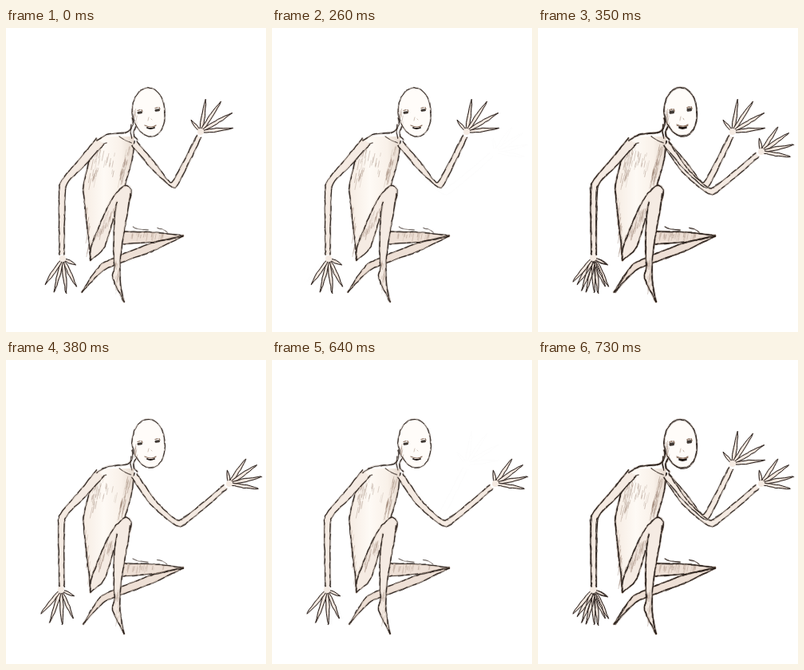
Write an HTML page that moves like this. It is 326x381 px and loops after 760 ms.

```html
<!DOCTYPE html>
<html lang="en">
<head>
<meta charset="utf-8">
<title>Waving figure</title>
<style>
  html, body { margin: 0; width: 100%; height: 100%; overflow: hidden; background: #fff; }
  svg { display: block; width: 326px; height: 381px; background: #fff; isolation: isolate; }
  .pose { mix-blend-mode: darken; }
  path { stroke-linecap: round; stroke-linejoin: round; }
</style>
</head>
<body>
<svg id="stage" viewBox="0 0 326 381">
  <defs>
    <linearGradient id="torso">
      <stop offset="0" stop-color="#f6ece3"/>
      <stop offset=".4" stop-color="#fefaf5"/>
      <stop offset=".75" stop-color="#f9f1e9"/>
      <stop offset="1" stop-color="#e6d9ce"/>
    </linearGradient>
  </defs>
</svg>
<script>
const INK = '#1d1511', BROWN = '#8a6f5e', SKIN = '#f5ebe3', SHADE = '#eee0d6';
const stage = document.getElementById('stage');
let seed = 1, g;
const rnd = () => (seed = seed * 16807 % 2147483647) / 2147483647;
const jit = a => (rnd() - .5) * a;
const pts = s => s.split(' ').map(p => p.split(',').map(Number));
const polar = ([x, y], deg, r) =>
  [x + r * Math.cos(deg * Math.PI / 180), y + r * Math.sin(deg * Math.PI / 180)];

function add(parent, tag, attrs) {
  const e = document.createElementNS('http://www.w3.org/2000/svg', tag);
  for (const k in attrs) e.setAttribute(k, attrs[k]);
  return parent.appendChild(e);
}

// Samples a smooth curve through the key points, about every 4 px
function trace(p, stiff = 6) {
  const out = [p[0]];
  for (let i = 0; i < p.length - 1; i++) {
    const a = p[i - 1] || p[i], b = p[i], c = p[i + 1], d = p[i + 2] || c;
    const n = Math.max(2, Math.round(Math.hypot(c[0] - b[0], c[1] - b[1]) / 4));
    for (let j = 1; j <= n; j++) {
      const t = j / n, u = 1 - t;
      out.push([0, 1].map(k => u * u * u * b[k] + 3 * u * u * t * (b[k] + (c[k] - a[k]) / stiff) +
        3 * u * t * t * (c[k] - (d[k] - b[k]) / stiff) + t * t * t * c[k]));
    }
  }
  return out;
}

const poly = (p, wobble = 0) =>
  'M' + p.map(([x, y]) => `${(x + jit(wobble)).toFixed(1)},${(y + jit(wobble)).toFixed(1)}`).join('L');
const fill = (p, color) => add(g, 'path', { d: poly(p) + 'Z', fill: color });
const stroke = (d, color, width, opacity = 1, dash = 'none') => add(g, 'path',
  { d, fill: 'none', stroke: color, 'stroke-width': width, opacity, 'stroke-dasharray': dash });

// Pencil line: soft smudge, scratchy core, broken second pass
function ink(p, w = 1) {
  stroke(poly(p), BROWN, 2.8 * w, .22);
  stroke(poly(p, .9), INK, .8 * w, .9);
  const dash = [4, 5, 9, 3, 6, 8].map(v => (v * (.6 + rnd())).toFixed(1)).join(' ');
  stroke(poly(p, 1.4), INK, 1.1 * w, .75, dash);
}
const line = (s, w) => ink(trace(pts(s)), w);

// Limb through joints given as x,y,halfWidth
function limb(s, color = SKIN) {
  const joints = pts(s);
  const edge = side => trace(joints.map(([x, y, w], i) => {
    const a = joints[i - 1] || joints[i], b = joints[i + 1] || joints[i];
    const dx = b[0] - a[0], dy = b[1] - a[1], len = Math.hypot(dx, dy);
    return [x - side * w * dy / len, y + side * w * dx / len];
  }), 14);
  const l = edge(1), r = edge(-1);
  fill([...l, ...r.slice().reverse()], color);
  ink(l);
  ink(r);
}

function finger(c, deg, len, w) {
  const side = s => [polar(polar(c, deg, 4), deg + 90, s * w * .7),
    polar(polar(c, deg, len * .5), deg + 90, s * w), polar(c, deg, len)];
  const d = trace([...side(-1), ...side(1).reverse().slice(1)], 9);
  fill(d, SKIN);
  stroke(poly(d, .7), BROWN, 2, .2);
  stroke(poly(d, .9), INK, 1, .95);
}

// Four fingers fanned from the first angle, thumb on the near side
function hand({ at, first, step, len }) {
  finger(at, first - 1.95 * step, len * .43, 1.6);
  for (let i = 0; i < 4; i++)
    finger(at, first + i * step, len * (.9 + .16 * Math.sin(Math.PI * (i + .2) / 3.4)), 2.1);
  add(g, 'circle', { cx: at[0], cy: at[1], r: 4, fill: SKIN });
}

// Short slanted strokes scattered along a band
function hatch(x, y, dx, dy, spread, n, len = 10) {
  for (let i = 0; i < n; i++) {
    const t = rnd(), l = len * (.4 + rnd());
    stroke(`M${x + dx * t + jit(spread)},${y + dy * t + jit(5)}l${-l * .2},${l}`,
      BROWN, .8, .15 + rnd() * .35);
  }
}

function torso() {
  const left = trace(pts('120,136 110,150 98,192 98,215 104,268 106,291'));
  const right = trace(pts('161,136 158,165 149,198 128,266 106,291'));
  fill([...left, ...right.slice().reverse()], 'url(#torso)');
  hatch(116, 150, -8, 45, 9, 22);
  hatch(154, 148, -10, 42, 6, 36);
  hatch(126, 142, 2, 40, 26, 14);
  hatch(101, 215, 4, 60, 5, 18);
  ink(left.slice(4), 1.1);
  line('161,142 158,165 149,198');
  line('126,144 118,147 112,154', .6);
  line('142,136 150,141 157,144', .6);
}

function head(dy) {
  const ring = Array.from({ length: 49 }, (_, i) => {
    const a = i * Math.PI / 24, s = Math.sin(a);
    return [178.5 + 20.5 * Math.cos(a) + 3 * Math.max(0, s), 105.5 + dy + 30.5 * s];
  });
  fill(ring, '#fffcf9');
  ink(ring, .9);
  hatch(161, 100, 3, 18, 3, 10, 6);
  for (const [x, y] of [[168, 105.5], [190, 102.5]]) {
    stroke(`M${x - 2},${y + dy + .8}l3.500,-.6`, INK, 3, .85);
    stroke(`M${x - 3},${y + dy - 2}l3,-1m2,0l1,2`, BROWN, 1.2);
  }
  stroke(`M174,${122 + dy}q4,2 8,2t6,-2`, BROWN, 1.2);
  stroke(`M177,${125 + dy}q4,2 9,0`, INK, 1.8);
  stroke(`M179,${112 + dy}l-1,4m4,-2l1,1`, '#c4b4a8', .8);
  line('158,113 159,121 153,130 140,132 126,134 114,141', 1.1);
  line('163,124 160,130 161,136 165,140', 1.1);
  line('157,121 156,130 158,138', .8);
}

function legs(foot) {
  limb('147,263,8 186,262,6 222,260,0', SHADE);
  hatch(153, 258, 45, 0, 6, 20, 7);
  limb(`222,261,0 182,275,5 122,299,4 ${foot},331,0`, SHADE);
  line('159,249 166,252 178,253', .5);
  line('190,251 196,252 202,256', .5);
  const thigh = trace(pts('106,291 106,277 113,258 121,238 133,214 143,202 151,197 157,203 155,216'));
  const under = trace(pts('106,291 122,277 129,259 138,232 155,216'));
  fill([...thigh, ...under.slice().reverse()], SKIN);
  hatch(112, 262, 22, -38, 8, 26, 9);
  const front = trace(pts('139,218 136,240 135,275 136,300 134,314 148,343'));
  const back = trace(pts('156,208 153,228 147,262 143,295 144,322 148,343'));
  fill([...front, ...back.slice().reverse()], SKIN);
  hatch(140, 290, 0, 35, 4, 14, 7);
  ink(thigh, 1.1);
  ink(under.slice(0, 16));
  ink(front, 1.1);
  ink(back, 1.1);
}

function draw(o) {
  seed = o.seed;
  g = add(stage, 'g', { class: 'pose' });
  torso();
  limb(o.rest);
  hand(o.low);
  limb(o.wave);
  hand(o.high);
  head(o.headY);
  legs(o.foot);
  return g;
}

const up = draw({
  seed: 71, headY: 0, foot: 95,
  rest: '118,142,6 93,171,5 71,198,4 70,284,3',
  low: { at: [71, 289], first: 64, step: 20, len: 42 },
  wave: '161,145,4 185,173,4 210,197,4 242,136,3',
  high: { at: [244, 130], first: -81, step: 25, len: 44 }
});
const out = draw({
  seed: 913, headY: -1, foot: 97,
  rest: '118,142,6 93,171,5 70,199,4 70,284,3',
  low: { at: [69, 288], first: 67, step: 21, len: 42 },
  wave: '161,145,4 184,178,4 218,205,4 275,159,3',
  high: { at: [280, 155], first: -56, step: 22, len: 40 }
});

// The incoming pose darkens over the held one, which then drops out
const LOOP = 760, STEP = 30;
function level(t) {
  const u = Math.min(1, Math.max(0, (Math.floor(t / STEP) - 1.9) / 1.6));
  return u * u * (3 - 2 * u);
}

function frame(now) {
  const t = now % LOOP;
  up.style.opacity = t < 380 ? 1 : level(t - 580);
  out.style.opacity = level(t - 200);
  requestAnimationFrame(frame);
}
requestAnimationFrame(frame);
</script>
</body>
</html>
```
